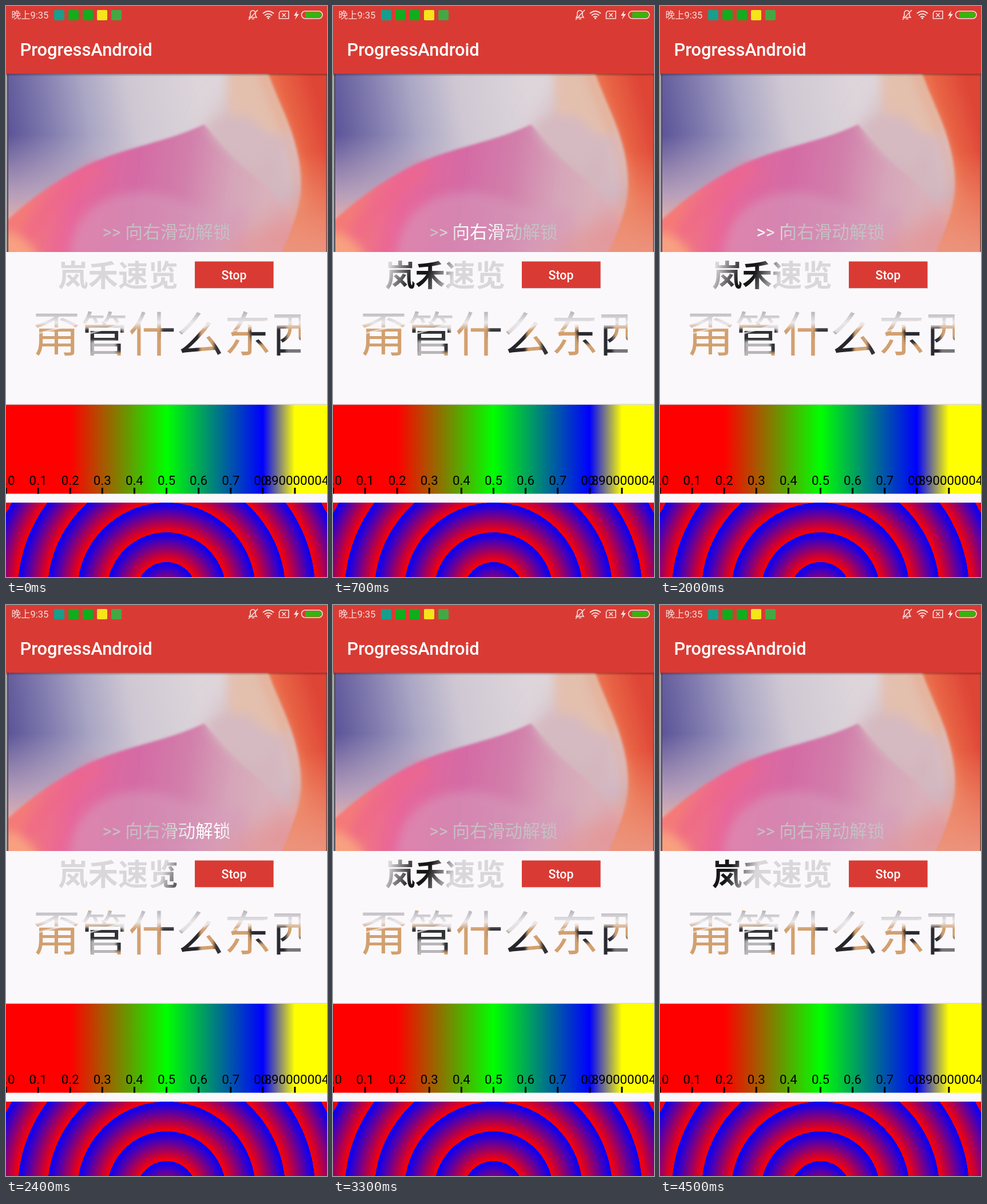
Write an HTML page that moves like this. It is 561 px wide and 998 px high and loops after 4600 ms.

```html
<!DOCTYPE html>
<html lang="zh">
<head>
<meta charset="utf-8">
<title>ProgressAndroid</title>
<style>
  html, body { margin: 0; width: 100%; height: 100%; overflow: hidden; background: #faf8fb; }
  svg { display: block; width: 100vw; height: 100vh; }
  text { font-family: Roboto, "Noto Sans CJK SC", "Noto Sans CJK", sans-serif; }
</style>
</head>
<body>
<svg viewBox="0 0 561 998">
  <defs>
    <linearGradient id="sky" gradientUnits="userSpaceOnUse" x1="0" y1="210" x2="340" y2="150">
      <stop offset="0" stop-color="#5b5398"/>
      <stop offset=".22" stop-color="#827daf"/>
      <stop offset=".42" stop-color="#aaa6c4"/>
      <stop offset=".65" stop-color="#cfc8d3"/>
      <stop offset="1" stop-color="#ddd5da"/>
    </linearGradient>
    <linearGradient id="haze" gradientUnits="userSpaceOnUse" x1="0" y1="225" x2="0" y2="430">
      <stop offset="0" stop-color="#d8c4cf" stop-opacity="0"/>
      <stop offset=".5" stop-color="#ccb0c2" stop-opacity=".8"/>
      <stop offset=".75" stop-color="#e8b0a8"/>
      <stop offset="1" stop-color="#f78d70"/>
    </linearGradient>
    <linearGradient id="wave" gradientUnits="userSpaceOnUse" x1="40" y1="300" x2="450" y2="360">
      <stop offset="0" stop-color="#f47a78"/>
      <stop offset=".2" stop-color="#e8669a"/>
      <stop offset=".45" stop-color="#d46ba5"/>
      <stop offset=".65" stop-color="#d27fab"/>
      <stop offset=".85" stop-color="#d6a5b9"/>
      <stop offset="1" stop-color="#d9b1bb"/>
    </linearGradient>
    <linearGradient id="ember" gradientUnits="userSpaceOnUse" x1="440" y1="250" x2="561" y2="215">
      <stop offset="0" stop-color="#ee8a5c"/>
      <stop offset=".5" stop-color="#ea6a48"/>
      <stop offset="1" stop-color="#de4436"/>
    </linearGradient>
    <linearGradient id="emberLow" x1="0" y1="0" x2="0" y2="1">
      <stop offset=".45" stop-color="#ef9478" stop-opacity="0"/>
      <stop offset="1" stop-color="#ec9480"/>
    </linearGradient>
    <linearGradient id="shade" x1="0" y1="0" x2="0" y2="1">
      <stop offset="0" stop-color="#000" stop-opacity=".35"/>
      <stop offset="1" stop-color="#000" stop-opacity="0"/>
    </linearGradient>
    <linearGradient id="unlockShine" gradientUnits="userSpaceOnUse" x1="-75" y1="0" x2="75" y2="0">
      <stop offset="0" stop-color="#c5c0c3"/>
      <stop offset=".38" stop-color="#fff"/>
      <stop offset=".62" stop-color="#fff"/>
      <stop offset="1" stop-color="#c5c0c3"/>
    </linearGradient>
    <linearGradient id="brandShine" gradientUnits="userSpaceOnUse" x1="-55" y1="0" x2="55" y2="0">
      <stop offset="0" stop-color="#d9d7d9"/>
      <stop offset=".4" stop-color="#161616"/>
      <stop offset=".6" stop-color="#161616"/>
      <stop offset="1" stop-color="#d9d7d9"/>
    </linearGradient>
    <linearGradient id="fade" x1="0" y1="0" x2="0" y2="1">
      <stop offset="0" stop-color="#b9b6bc"/>
      <stop offset=".3" stop-color="#d3d0d4"/>
      <stop offset=".6" stop-color="#eae7ea"/>
      <stop offset="1" stop-color="#eae7ea" stop-opacity="0"/>
    </linearGradient>
    <linearGradient id="spectrum">
      <stop offset=".2" stop-color="#f00"/>
      <stop offset=".5" stop-color="#0f0"/>
      <stop offset=".8" stop-color="#00f"/>
      <stop offset=".9" stop-color="#ff0"/>
    </linearGradient>
    <radialGradient id="ripple" gradientUnits="userSpaceOnUse" cx="280.5" cy="1024" r="52" spreadMethod="repeat">
      <stop offset="0" stop-color="#f00"/>
      <stop offset="1" stop-color="#00f"/>
    </radialGradient>
    <filter id="soft" x="-30%" y="-30%" width="160%" height="160%"><feGaussianBlur stdDeviation="2"/></filter>
    <filter id="softer" x="-50%" y="-50%" width="200%" height="200%"><feGaussianBlur stdDeviation="9"/></filter>
    <filter id="softest" x="-80%" y="-80%" width="260%" height="260%"><feGaussianBlur stdDeviation="22"/></filter>
    <clipPath id="screen"><rect y="118" width="561" height="312"/></clipPath>
    <clipPath id="photoBox"><rect x="40" y="530" width="475" height="90"/></clipPath>
    <clipPath id="photoText"><text x="46.5" y="604" font-size="83.5">甭管什么东西</text></clipPath>
  </defs>

  <rect width="561" height="998" fill="#faf8fb"/>

  <!-- wallpaper -->
  <g clip-path="url(#screen)">
    <rect y="118" width="561" height="312" fill="url(#sky)"/>
    <rect y="118" width="561" height="312" fill="url(#haze)"/>
    <ellipse cx="425" cy="270" rx="75" ry="115" fill="#d4b6bd" filter="url(#softest)"/>
    <path d="M386 100H480L500 215Q440 250 404 215Q384 190 386 100Z" fill="#e3bfae" filter="url(#softer)"/>
    <path d="M-30 440V405C35 340 85 306 140 279C205 247 275 240 346 207C365 225 385 255 425 290Q480 330 530 440Z" fill="url(#wave)" filter="url(#soft)"/>
    <path d="M350 205Q368 255 440 285L480 240L420 190Z" fill="#d5bac1" filter="url(#softer)"/>
    <path d="M20 430Q65 345 165 281" fill="none" stroke="#ef6688" stroke-width="26" opacity=".6" filter="url(#softer)"/>
    <path d="M110 440C112 365 170 325 235 325C300 325 335 370 420 350V440Z" fill="#d79bbb" opacity=".55" filter="url(#softer)"/>
    <path d="M-20 450V400Q30 380 62 450Z" fill="#f8a080" filter="url(#softer)"/>
    <path d="M345 450Q425 405 475 365Q530 340 550 450Z" fill="#e69292" opacity=".8" filter="url(#softest)"/>
    <path d="M452 100C475 170 501 205 513 275C520 322 518 355 480 440H580V100Z" fill="url(#ember)" filter="url(#soft)"/>
    <path d="M452 100C475 170 501 205 513 275C520 322 518 355 480 440H580V100Z" fill="url(#emberLow)" filter="url(#soft)"/>
    <path d="M446 110C470 175 492 210 507 275Q516 330 510 360" fill="none" stroke="#e99a78" stroke-width="12" opacity=".55" filter="url(#softer)"/>
    <rect y="118" width="2" height="312" fill="#a9a5a8"/>
    <rect x="2" y="118" width="2" height="312" fill="#4b4a55"/>
    <rect x="559.5" y="118" width="1.5" height="312" fill="#75504d"/>
    <rect y="118" width="561" height="5" fill="url(#shade)"/>
  </g>
  <text x="280.5" y="406" font-size="30.7" text-anchor="middle" fill="url(#unlockPaint)">&gt;&gt; 向右滑动解锁</text>

  <!-- status and app bar -->
  <rect width="561" height="118.5" fill="#d93b34"/>
  <text x="9.5" y="22" font-size="16.5" fill="#f7dfdd">晚上9:35</text>
  <g id="badges"></g>
  <g fill="none" stroke="#f7dfdd" stroke-width="1.6">
    <path d="M425 20H438L436 17V13Q436 8 431.500 8Q427 8 427 13V17ZM429.500 22.500H434M424 24L440 7"/>
    <path d="M449 13Q458.500 5 468 13M452 16.500Q458.500 11 465 16.500M455 19.500Q458.500 17 462 19.500" stroke-width="2"/>
    <path d="M458.500 20V23" stroke-width="2.500"/>
    <path d="M480 9H494V22H477.500V12ZM482.500 12.500L489 19M489 12.500L482.500 19"/>
    <rect x="516.500" y="9" width="36.500" height="13" rx="6.500"/>
  </g>
  <path d="M509 8L503 17H507L505 24L512 14H508Z" fill="#f7dfdd"/>
  <path d="M523 10.500H546.500A5 5 0 0 1 546.500 20.500H523Z" fill="#37b40e"/>
  <text x="24.5" y="87" font-size="30.8" font-weight="500" fill="#fff">ProgressAndroid</text>

  <!-- brand and button -->
  <text x="91" y="490" font-size="52.5" font-weight="900" fill="url(#brandPaint)">岚禾速览</text>
  <rect x="330" y="447" width="138" height="47.500" fill="#000" opacity=".12"/>
  <rect x="330" y="446.500" width="137.500" height="46.500" fill="#d93b34"/>
  <text x="398.500" y="478" font-size="21.3" font-weight="500" fill="#fff" text-anchor="middle">Stop</text>

  <!-- photo showing through the text -->
  <g clip-path="url(#photoBox)">
    <g clip-path="url(#photoText)">
      <rect x="40" y="530" width="480" height="90" fill="#d2a06f"/>
      <g filter="url(#soft)">
        <path d="M130 564L205 560V605H130Z" fill="#2f3035"/>
        <path d="M148 586H192V615H148Z" fill="#b9b6b8"/>
        <path d="M272 535H300V580H272Z" fill="#35343a"/>
        <path d="M298 575L338 560V615H298Z" fill="#26262b"/>
        <path d="M364 540H380V615H364Z" fill="#303036"/>
        <path d="M424 568L464 558V588L432 592Z" fill="#292a30"/>
        <path d="M466 560H490V615H466Z" fill="#292a30"/>
        <path d="M490 580H520V615H490Z" fill="#77747a"/>
        <path d="M300 555L350 540V562L306 574ZM186 560L215 545V568Z" fill="#e2dfe3"/>
      </g>
      <rect x="40" y="535" width="480" height="31" fill="url(#fade)"/>
      <path d="M45 575L125 555M130 577L210 554M300 580L365 552M385 572L460 549" stroke="#f4eff0" stroke-width="3" opacity=".65"/>
    </g>
  </g>

  <!-- gradient demos -->
  <rect y="695.5" width="561" height="1.500" fill="#d9d6da"/>
  <rect y="697" width="561" height="155.500" fill="url(#spectrum)"/>
  <g id="scale" font-size="22.3" text-anchor="middle"></g>
  <rect y="868" width="561" height="130" fill="url(#ripple)"/>
</svg>
<script>
const NS = 'http://www.w3.org/2000/svg';
const LOOP = 4600, STEP = 100;
const byId = id => document.getElementById(id);

function add(parent, tag, attrs, content = '') {
  const node = document.createElementNS(NS, tag);
  for (const key in attrs) node.setAttribute(key, attrs[key]);
  node.textContent = content;
  parent.append(node);
  return node;
}

// A movable copy of a gradient, used as text paint.
function movingPaint(base, id) {
  const paint = byId(base);
  paint.id = id;
  return paint;
}
const unlock = movingPaint('unlockShine', 'unlockPaint');
const brand = movingPaint('brandShine', 'brandPaint');

['#169f8c', '#10ad1d', '#10ad1d', '#f6e51b', '#43a843'].forEach((fill, i) =>
  add(byId('badges'), 'rect', { x: 84 + i * 25, y: 7, width: 18, height: 18, rx: 2, fill }));

for (let i = 0; i < 10; i++) {
  const x = i * 56.1;
  add(byId('scale'), 'rect', { x: x - 1.5, y: 842, width: 3, height: 10.5 });
  add(byId('scale'), 'text', { x, y: 837 }, i < 9 ? (i / 10).toFixed(1) : '0.90000004');
}

function draw(t) {
  const unlockX = 255 + 0.485 * (t % 1500 - 700);
  const brandX = 152 + 0.45 * ((t + 1100) % 1300 - 500);
  unlock.setAttribute('gradientTransform', `translate(${unlockX} 0)`);
  brand.setAttribute('gradientTransform', `translate(${brandX} 470) rotate(20)`);
}

const start = performance.now();
function tick() {
  const t = (performance.now() - start) % LOOP;
  draw(Math.floor(t / STEP) * STEP);
  requestAnimationFrame(tick);
}
tick();
</script>
</body>
</html>
```
